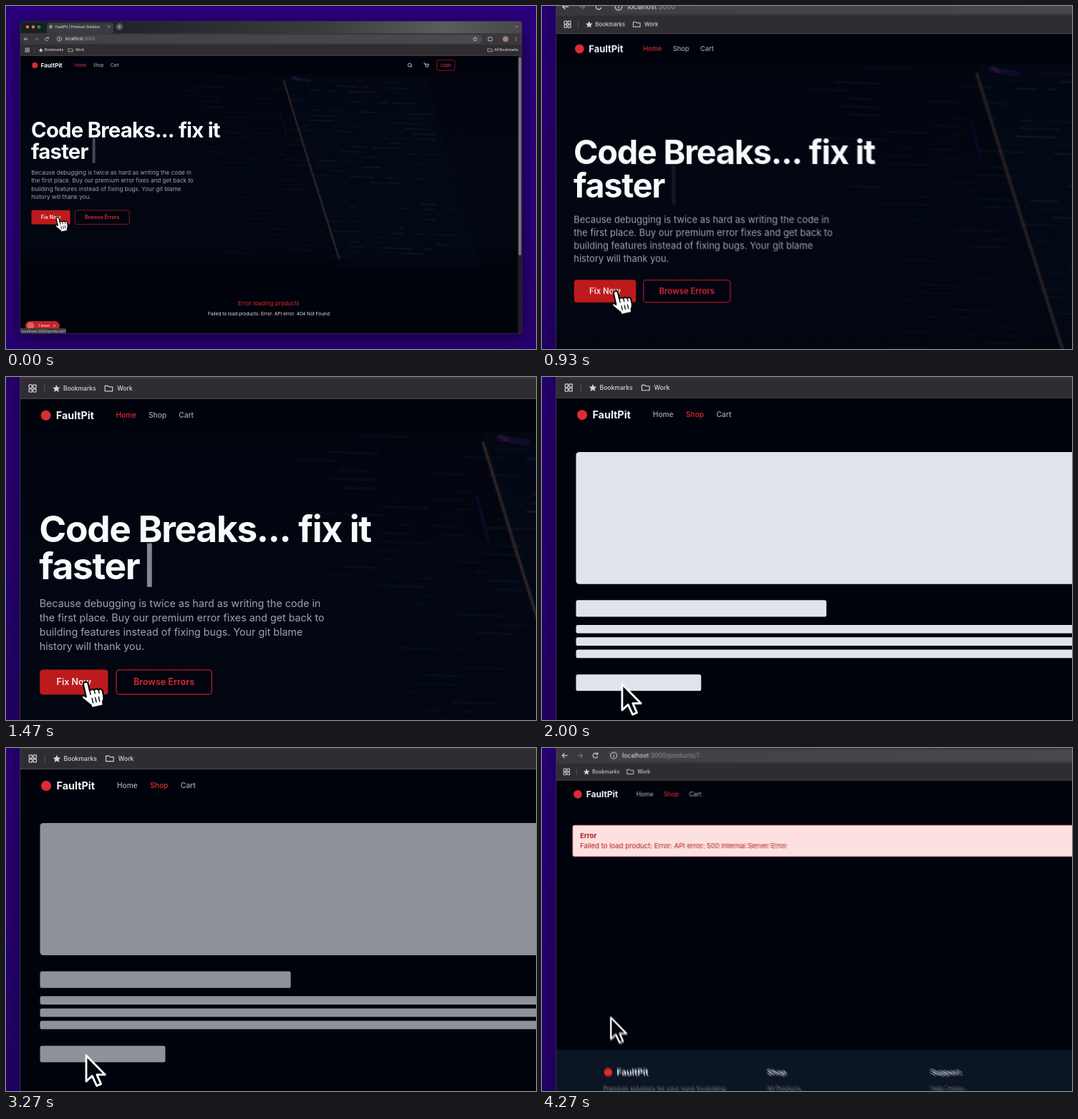
Recreate the animation shown at these times as an HTML page with a canvas. Size 740 px wide and 480 px high, loop 4340 ms.

```html
<!DOCTYPE html>
<html lang="en">
<head>
<meta charset="utf-8">
<title>Zooming browser demo</title>
<style>
html, body { margin: 0; width: 740px; height: 480px; overflow: hidden; background: #29007a; }
canvas { display: block; }
</style>
</head>
<body>
<canvas id="stage" width="740" height="480"></canvas>
<script>
const W = 740, H = 480, LOOP = 4340, STEP = 200 / 3, LAST = 64;
const CLICK = 1930, FAIL = 3600, COLLAPSE = 270;
const ZOOM_IN = 538, ZOOM_OUT = 4104, SHUTTER = 10;
const BRAND = 'FaultPit', RED = '#db2c32', NIGHT = '#01030c';
const INTER = 'Inter, "Liberation Sans", sans-serif';

const screen = document.getElementById('stage').getContext('2d');
const buffer = document.createElement('canvas');
buffer.width = W;
buffer.height = H;
const g = buffer.getContext('2d');

// ---- helpers ----
function text(str, x, y, size, color, weight = 400, align = 'left', spacing = 0) {
  g.font = `${weight} ${size}px ${INTER}`;
  g.letterSpacing = spacing + 'px';
  g.textAlign = align;
  g.fillStyle = color;
  g.fillText(str, x, y + size * 0.36);
  return g.measureText(str).width;
}

function box(x0, y0, x1, y1, fill, r = 0, stroke, line = 0.8) {
  g.beginPath();
  g.roundRect(x0, y0, x1 - x0, y1 - y0, r);
  if (fill) { g.fillStyle = fill; g.fill(); }
  if (stroke) { g.strokeStyle = stroke; g.lineWidth = line; g.stroke(); }
}

function dot(x, y, r, fill) {
  g.beginPath();
  g.arc(x, y, r, 0, 7);
  g.fillStyle = fill;
  g.fill();
}

function path(d, x, y, color, line = 0.8, fill) {
  const p = new Path2D(d);
  g.save();
  g.translate(x, y);
  g.lineJoin = g.lineCap = 'round';
  if (fill) { g.fillStyle = fill; g.fill(p); }
  if (line) { g.strokeStyle = color; g.lineWidth = line; g.stroke(p); }
  g.restore();
}

function ramp(x0, y0, x1, y1, ...stops) {
  const grad = g.createLinearGradient(x0, y0, x1, y1);
  stops.forEach(([at, color]) => grad.addColorStop(at, color));
  return grad;
}

function keyed(keys, t) {
  for (let i = 1; i < keys.length; i++) {
    const [t0, a] = keys[i - 1], [t1, b] = keys[i];
    if (t <= t1) return a + (b - a) * (t - t0) / (t1 - t0);
  }
  return keys[keys.length - 1][1];
}

function random(seed) {
  return () => (seed = (seed * 16807) % 2147483647) / 2147483647;
}

// ---- motion ----
// Overdamped spring: quick start, long settle.
function spring(ms) {
  const s = Math.max(0, ms) / 1000, slow = 4.15, fast = 25;
  return 1 - (fast * Math.exp(-slow * s) - slow * Math.exp(-fast * s)) / (fast - slow);
}
const zoom = t => 1 + 0.776 * (spring(t - ZOOM_IN) - spring(t - ZOOM_OUT));
const caret = t => keyed([[0, .28], [300, .5], [600, .27], [930, .06], [1470, .55], [CLICK, .8]], t);
const pulse = t => 0.75 + 0.25 * Math.cos(Math.PI * (t - CLICK) / 1000);

// ---- browser frame ----
const STAR = 'M0 -3L.9 -1L3 -.8L1.4 .6L1.9 2.7L0 1.6L-1.9 2.7L-1.4 .6L-3 -.8L-.9 -1Z';
const FOLDER = 'M-3 -2H-.6L.3 -1.2H3V2.2H-3Z';

function chrome(t) {
  const ink = '#d5d4d7', dim = '#77767a';
  box(20, 21, 720, 38.5, ramp(20, 0, 720, 0, [0, '#15201d'], [.2, '#202427'], [.6, '#3a3b3d'], [.85, '#5c5c5d'], [1, '#48484a']));
  box(57, 23.6, 150, 38.5, '#3b3c3f', 3);
  dot(30, 29.2, 2.2, '#fe5f57');
  dot(38, 29.2, 2.2, '#ee6a5c');
  dot(46, 29.2, 2.2, '#35a453');
  dot(46, 29.2, 1, '#14512a');
  dot(62.5, 29, 2.5, '#8d9094');
  text(BRAND + ' | Premium Solution.', 69, 29, 4.8, '#d8d9db', 500);
  path('M-1.3 -1.3L1.3 1.3M1.3 -1.3L-1.3 1.3', 143.5, 29, ink, .6);
  dot(158.5, 29, 5, '#505255');
  path('M-1.8 0H1.8M0 -1.8V1.8', 158.5, 29, ink, .6);
  path('M-1.5 -.7L0 .8L1.5 -.7', 713, 29, ink, .7);

  box(20, 38, 720, 54.5, '#3a383b');
  box(68, 40.3, 665, 52.2, ramp(68, 0, 665, 0, [0, '#414043'], [1, '#4b4a4c']), 6);
  path('M2.4 0H-2.4M-.4 -2L-2.4 0L-.4 2', 28, 46.2, ink);
  path('M-2.4 0H2.4M.4 -2L2.4 0L.4 2', 42.5, 46.2, dim);
  path('M2 -1.2A2.3 2.3 0 1 0 2.2 .9M2.3 -2.6V-1H.7', 57, 46.2, ink);
  path('M3 0A3 3 0 1 1 -3 0A3 3 0 1 1 3 0M0 -.2V1.5M0 -1.5V-1.4', 74.5, 46.2, ink, .7);
  const w = text('localhost', 82.5, 46.2, 5.9, '#ececee');
  text(t < CLICK ? ':3000' : ':3000/products/1', 82.5 + w, 46.2, 5.9, '#9b9a9e');
  path(STAR, 655, 46.3, ink, .6);
  path('M-2.4 -1.8H-.8A1 1 0 0 1 1.2 -1.8H2.6V-.2A1 1 0 0 1 2.6 1.6V2.8H-2.4Z', 676, 46, ink);
  dot(697.5, 46.2, 4, '#a08078');
  [-2, 0, 2].forEach(d => dot(712, 46.2 + d, .6, ink));

  box(20, 54, 720, 70, '#302d32');
  box(20, 69.4, 720, 70, '#47444a');
  [-2.9, .4].forEach(dx => [-2.9, .4].forEach(dy =>
    box(29.8 + dx, 61.7 + dy, 32.2 + dx, 64.1 + dy, null, .3, ink, .7)));
  box(39, 58.5, 39.5, 65, '#5a575c');
  path(STAR, 48.7, 61.8, ink, 0, ink);
  text('Bookmarks', 54.1, 61.6, 4.85, ink, 500);
  path(FOLDER, 90.3, 61.6, ink, .65);
  text('Work', 97, 61.6, 4.85, ink, 500);
  path(FOLDER, 676, 61.6, ink, .65);
  text('All Bookmarks', 682, 61.6, 4.85, ink, 500);

  box(714.5, 70, 720, 458, '#1d1d20');
  box(715.6, 71.5, 719.4, 349, '#77777a', 2);
}

// ---- page parts ----
function logo(x, y) {
  dot(x, y, 4, RED);
  text(BRAND, x + 8.1, y, 8.14, '#f3f4f6', 700);
}

function nav(active) {
  logo(40.3, 83.1);
  [['Home', 96], ['Shop', 122], ['Cart', 146]].forEach(([name, x]) =>
    text(name, x, 83, 5.75, name === active ? RED : '#a3a8b2', 500));
  path('M2 -.4A2.4 2.4 0 1 1 -2.8 -.4A2.4 2.4 0 1 1 2 -.4M1.3 1.3L3 3', 564, 83, '#e4e6ea', .8);
  path('M-3.4 -3H-2.2L-1 1.3H2.4L3.2 -1.6H-1.8M-.6 3V3.1M2 3V3.1', 587, 83, '#e4e6ea', .8);
  box(601.5, 75.7, 626.7, 90.3, null, 2.4, '#b3202a', .7);
  text('Login', 614.1, 83, 5.75, RED, 500, 'center');
}

// Dim, out-of-focus code on a monitor behind the headline.
function backdrop() {
  box(20, 95, 714.5, 366, ramp(0, 95, 0, 366, [0, '#02040e'], [.5, '#020713'], [.9, '#020610'], [1, NIGHT]));
  path('M0 0H198L278 270H78Z', 387, 96, '', 0, 'rgba(4,13,27,.4)');
  const rnd = random(77);
  for (let row = 0; row < 36; row++) {
    const y = 103 + row * 7;
    let x = 225 + rnd() * 70 + row * 2;
    while (x < 565 + row * 2.1) {
      const len = 8 + rnd() * 34, shade = rnd(), show = rnd();
      const onScreen = x > 392 + row * 2.2;
      if (show > .4) {
        g.globalAlpha = (onScreen ? .22 : .12) * (.4 + shade * .6);
        g.strokeStyle = shade > .9 ? '#4a3b3d' : shade > .4 ? '#24485a' : '#1b2a5a';
        g.lineWidth = 2;
        g.beginPath();
        g.moveTo(x, y + (x - 400) * .035);
        g.lineTo(x + len, y + (x + len - 400) * .035);
        g.stroke();
      }
      x += len + 4 + rnd() * 22;
    }
  }
  g.globalAlpha = 1;
  path('M0 0L28 92L77 248', 388, 105, 'rgba(92,64,58,.2)', 3.6);
  path('M0 0L28 92L77 248', 388, 105, 'rgba(92,64,58,.34)', 1.8);
  path('M0 0L9 34', 383, 148, 'rgba(50,28,130,.2)', 2.2);
  path('M0 0L22 4', 401, 101, 'rgba(50,32,110,.25)', 5);
  path('M0 0L5 3', 402, 100, 'rgba(130,30,50,.25)', 3);
}

function home(t) {
  backdrop();
  nav('Home');
  const title = (line, y) => text(line, 35, y, 29.3, '#f8fafc', 700, 'left', -0.77);
  title('Code Breaks... fix it', 173.7);
  title('faster', 203);
  box(120.7, 185, 124.6, 219.8, `rgba(240,243,248,${caret(t)})`);
  ['Because debugging is twice as hard as writing the code in',
   'the first place. Buy our premium error fixes and get back to',
   'building features instead of fixing bugs. Your git blame',
   'history will thank you.'].forEach((line, i) => text(line, 35.2, 232.9 + i * 11.4, 8.14, '#a0a4ae'));
  box(35.5, 285.7, 89.7, 305.6, '#bd1a1c', 2.4);
  text('Fix Now', 62.6, 295.6, 7.15, '#fbeaea', 600, 'center');
  box(96.3, 285.9, 172.2, 305.4, 'rgba(1,3,12,.5)', 2.4, '#a81c22');
  text('Browse Errors', 134.2, 295.6, 7.15, RED, 600, 'center');
  text('Error loading products', 367, 416.4, 8.14, RED, 400, 'center');
  text('Failed to load products: Error: API error: 404 Not Found', 367, 430.4, 6.5, '#e3e6ea', 400, 'center');
  if (t < COLLAPSE - 5) {
    box(27, 441, 75, 454, '#c3242b', 6.5);
    dot(34.5, 447.5, 4.8, '#e0605f');
    text('1 Issue', 45, 447.5, 5, '#ffdcdc', 500);
    path('M-1.2 -1.2L1.2 1.2M1.2 -1.2L-1.2 1.2', 67.5, 447.5, '#ffdcdc', .6);
  } else {
    dot(34, 447, 6, '#0b0b0d');
  }
  box(20, 451, 84, 458.5, '#3b3a3e', [0, 2, 0, 0]);
  text('localhost:3000/products/1', 21.5, 454.7, 5, '#d0d0d3');
}

function loading(t) {
  nav('Shop');
  g.globalAlpha = pulse(t);
  [[35.5, 112.4, 698.5, 216.6, 2.6], [35.5, 229.3, 232.6, 242.4, 1.6],
   [35.5, 248.8, 698.5, 255.4, 1.6], [35.5, 258.6, 698.5, 265.2, 1.6],
   [35.5, 268.3, 698.5, 274.9, 1.6], [35.5, 287.9, 134, 300.9, 1.6]]
    .forEach(([x0, y0, x1, y1, r]) => box(x0, y0, x1, y1, '#e2e5ee', r));
  g.globalAlpha = 1;
}

function failed() {
  nav('Shop');
  box(35.6, 112.6, 698.5, 142.3, '#fde1e1', 1.6, '#f08a8a', .5);
  text('Error', 42.5, 122.7, 6.5, '#b91c1c', 700);
  text('Failed to load product: Error: API error: 500 Internal Server Error', 42.5, 132.2, 6.5, '#b91c1c');
  box(20, 326, 714.5, 458, '#0b1524');
  logo(69.2, 347.5);
  text('Premium solutions for your most frustrating', 64.6, 363.3, 5.7, '#8d95a3');
  [['Shop', 'All Products', 220.2], ['Support', 'Help Center', 375.6]].forEach(([head, link, x]) => {
    text(head, x, 347.6, 7.33, '#e8eaee', 600);
    text(link, x, 363.3, 5.7, '#8d95a3');
  });
}

function hand() {
  g.save();
  g.translate(71.8, 295.6);
  g.rotate(-0.22);
  g.scale(1.12, 1.06);
  path('M-1.9 1.6Q-1.9 0 -.2 0Q1.6 0 1.6 1.6V7Q3.4 5.8 4.8 7.2Q6.6 6.2 7.8 7.8Q9.8 7 10.4 9V13Q10.4 15.5 8.8 17.5V20H.2V18Q-1.8 15.5 -4.6 11.6Q-5.4 9.6 -3.6 9.4L-1.9 11Z',
    0, 0, '#000', 1.1, '#fff');
  path('M1.6 7V10M4.8 7.4V10M7.8 8V10.4M2 13V16.5M4.4 13V16.5M6.8 13V16.5', 0, 0, '#000', .7);
  g.restore();
}

function arrow() {
  path('M0 0V20.5L4.7 16.2L8.3 24L11.6 22.5L8.4 15.2H14.8Z', 71.8, 295.5, '#fff', 1.6, '#04060d');
}

// ---- one sharp picture ----
function scene(t, s) {
  g.setTransform(1, 0, 0, 1, 0, 0);
  g.fillStyle = ramp(0, 0, 0, H, [0, '#2b007f'], [1, '#270072']);
  g.fillRect(0, 0, W, H);

  // Zoom about a point on the window's left edge.
  g.setTransform(s, 0, 0, s, 20 - 20 * s, 122 - 122 * s);
  g.shadowColor = 'rgba(0,0,0,.55)';
  g.shadowBlur = 26 * s;
  g.shadowOffsetY = 5 * s;
  box(20, 21.6, 720, 458, NIGHT, 3);
  g.shadowColor = 'transparent';

  g.save();
  g.beginPath();
  g.roundRect(20, 21.6, 700, 436.9, 3);
  g.clip();
  if (t < CLICK) home(t);
  else if (t < FAIL) loading(t);
  else failed();
  chrome(t);
  g.restore();

  box(19.8, 21.4, 720.2, 458.5, null, 3, 'rgba(190,190,205,.28)', .5);
  (t < CLICK ? hand : arrow)();
}

// Average several nearby zoom levels for motion blur.
function render(t) {
  const from = zoom(t - SHUTTER / 2), to = zoom(t + SHUTTER / 2);
  const n = Math.min(9, 1 + Math.ceil(Math.abs(to - from) * 500));
  for (let i = 0; i < n; i++) {
    scene(t, n === 1 ? zoom(t) : from + (to - from) * i / (n - 1));
    screen.globalAlpha = 1 / (i + 1);
    screen.drawImage(buffer, 0, 0);
  }
}

const start = performance.now();
let shown = -1;
function tick() {
  const t = (performance.now() - start) % LOOP;
  const step = Math.min(LAST, Math.floor((t + 4) / STEP));
  if (step !== shown) {
    shown = step;
    render(step * STEP);
  }
  requestAnimationFrame(tick);
}
tick();
</script>
</body>
</html>
```
